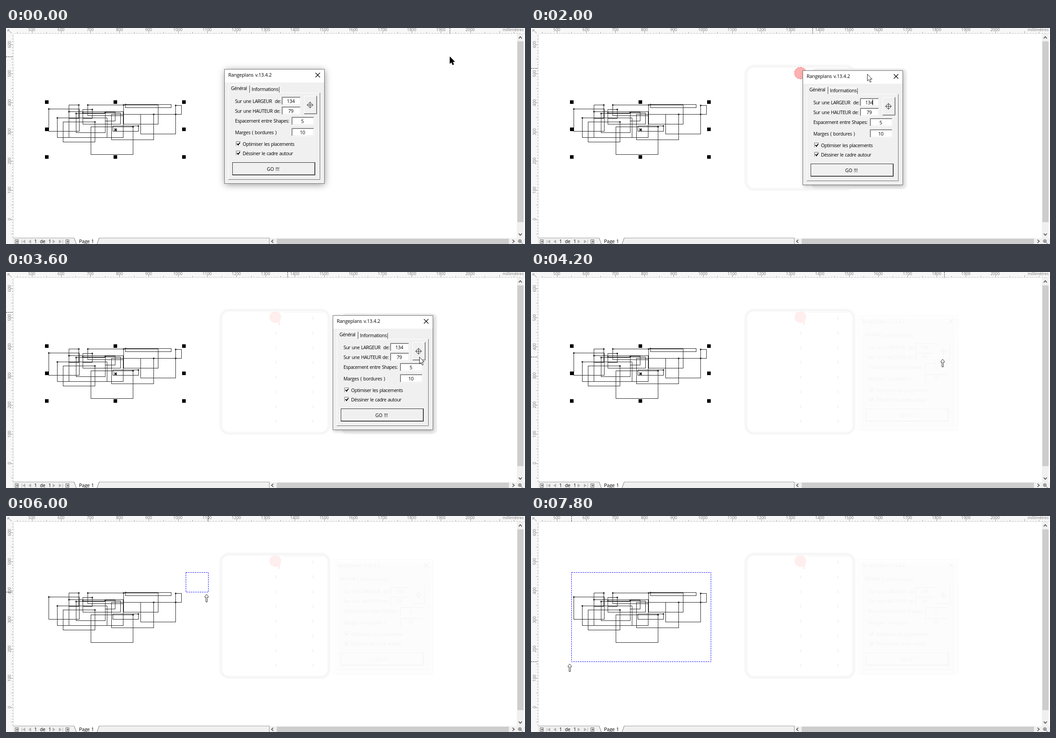
Write an HTML page with a canvas that moves like this. It is 1158x484 px and loops after 8 s.

```html
<!DOCTYPE html>
<html lang="fr">
<head>
<meta charset="utf-8">
<title>Alignement de formes</title>
<style>
html, body { margin: 0; width: 100%; height: 100%; overflow: hidden; background: #fff; }
canvas { display: block; }
</style>
</head>
<body>
<canvas id="stage" width="1158" height="484"></canvas>
<script>
const g = document.getElementById('stage').getContext('2d');
const LOOP = 8000, STEP = 200;
const ENTER = 1000, CLICK = 1400, DROP = 2800, CLOSE = 4200, SELECT = 5600;
const UI = '"Open Sans", "Noto Sans", sans-serif';
const ANCHOR = { x: 401, y: 126 };

// Where the pointer rests or turns: time, x, y
const stops = [[0, 990, 64], [ENTER, 628, 90], [1480, 602, 100], [2400, 840, 105], [DROP, 845, 105],
  [3600, 922, 190], [CLOSE, 922, 190], [5000, 220, 130], [SELECT, ANCHOR.x, ANCHOR.y],
  [6600, 557, 264], [7800, 90, 326]];

// Rectangles from their first node: x, y, width, height (a negative width runs left)
const shapes = [[95, 181, 68, 50], [114, 201, 111, 44], [198, 210, -71, 45], [162, 172, -22, 30],
  [140, 187, 121, 58], [156, 191, 65, 43], [192, 182, -21, 20], [171, 190, 84, 25],
  [182, 172, 80, 24], [262, 172, 77, 43], [266, 171, 102, 7], [221, 188, 22, 20],
  [329, 193, -94, 57], [378, 193, -78, 44], [295, 219, -57, 12], [283, 221, -94, 62],
  [378, 173, 13, 20]];

const ease = u => u * u * u * (u * (6 * u - 15) + 10);

function pointer(t) {
  const i = stops.findIndex(s => s[0] > t);
  if (i < 0) return stops[stops.length - 1].slice(1);
  const [a, b] = [stops[i - 1], stops[i]], k = ease((t - a[0]) / (b[0] - a[0]));
  return [1, 2].map(n => Math.round(a[n] + (b[n] - a[n]) * k));
}

// The dragged window trails the pointer slightly and stays where it is dropped
function dialogPlace(t) {
  const [x, y] = pointer(Math.min(Math.max(t - 58, CLICK), DROP));
  return [x - 115, y - 8];
}

function fill(x, y, w, h, color) {
  g.fillStyle = color;
  g.fillRect(x, y, w, h);
}

function frame(x, y, w, h, color) {
  g.strokeStyle = color;
  g.strokeRect(x + .5, y + .5, w, h);
}

function rounded(x, y, w, h, r) {
  g.beginPath();
  g.roundRect(x, y, w, h, r);
}

function circle(x, y, r) {
  g.beginPath();
  g.arc(x, y, r, 0, Math.PI * 2);
}

function line(color, width, ...pts) {
  g.strokeStyle = color;
  g.lineWidth = width;
  g.beginPath();
  pts.forEach(([x, y]) => g.lineTo(x, y));
  g.stroke();
  g.lineWidth = 1;
}

function poly(color, ...pts) {
  g.fillStyle = color;
  g.beginPath();
  pts.forEach(([x, y]) => g.lineTo(x, y));
  g.closePath();
  g.fill();
}

function dashed(pattern, draw) {
  g.setLineDash(pattern);
  draw();
  g.setLineDash([]);
}

function cross(x, y, r, width) {
  line('#000', width, [x - r, y - r], [x + r, y + r]);
  line('#000', width, [x + r, y - r], [x - r, y + r]);
}

// Two-tone edge: one colour on the top and left, another on the bottom and right
function bevel(x, y, w, h, light, dark) {
  line(light, 1, [x + .5, y + h], [x + .5, y + .5], [x + w, y + .5]);
  line(dark, 1, [x, y + h - .5], [x + w - .5, y + h - .5], [x + w - .5, y]);
}

function text(s, x, y, { size = 10.5, color = '#000', align = 'left', spacing = -.45 } = {}) {
  g.font = `${size}px ${UI}`;
  g.letterSpacing = spacing + 'px';
  g.wordSpacing = '1px';
  g.textAlign = align;
  g.fillStyle = color;
  g.fillText(s, x, y);
}

function rulers() {
  const label = { size: 9, color: '#777', align: 'center', spacing: 0 };
  fill(0, 0, 1158, 13, '#f7f7f7');
  fill(0, 0, 17, 484, '#f7f7f7');
  const tick = k => k % 10 ? (k % 5 ? 2 : 4) : 6;
  for (let k = -5; k < 168; k++) fill(Math.round(57.5 + k * 6.52), 13 - tick(k), 1, tick(k), '#9a9a9a');
  for (let k = -6; k < 64; k++) fill(16 - tick(k), Math.round(428.5 - k * 6.53), tick(k), 1, '#9a9a9a');
  fill(17, 12, 1141, 1, '#e0e0e0');
  fill(16, 13, 1, 471, '#e0e0e0');
  for (let i = 0; i < 16; i++) text(500 + i * 100, 57.5 + i * 65.2, 7, label);
  text('millimètres', 1131.5, 7, label);
  for (let i = 0; i < 7; i++) {
    g.save();
    g.translate(11, 428.5 - i * 65.3);
    g.rotate(-Math.PI / 2);
    text(i * 100, 0, 0, label);
    g.restore();
  }
  fill(0, 0, 16, 12, '#f7f7f7');
  line('#888', 1, [4, 8], [4, 4], [8, 4]);
  line('#888', 1, [4, 4], [13, 12]);
}

function chevron(x, y, dx, dy) {
  line('#444', 1.6, [x - dx * 2 + dy * 3.5, y - dy * 2 + dx * 3.5], [x + dx * 2, y + dy * 2],
    [x - dx * 2 - dy * 3.5, y - dy * 2 - dx * 3.5]);
}

function pageIcon(x) {
  frame(x - 4, 474, 7, 8, '#666');
  fill(x - 2, 478, 5, 1, '#444');
  fill(x, 476, 1, 5, '#444');
}

function playIcon(x, d, bar) {
  poly('#b4b4b4', [x - 3 * d, 474], [x - 3 * d, 483], [x + 3 * d, 478.5]);
  if (bar) fill(x + 5 * d, 474, 1, 9, '#b4b4b4');
}

function bars() {
  fill(1140, 13, 15, 458, '#f0f0f0');
  fill(1141, 30, 14, 405, '#cdcdcd');
  chevron(1147.5, 21.5, 0, -1);
  chevron(1147.5, 462.5, 0, 1);
  fill(17, 471, 1141, 13, '#f0f0f0');
  fill(17, 470, 571, 1, '#a0a0a0');
  poly('#fff', [152, 470], [208, 470], [203, 484], [157, 484]);
  line('#777', 1, [152, 470.5], [157, 484]);
  line('#777', 1, [208, 470.5], [203, 484]);
  pageIcon(24);
  playIcon(40, -1, true);
  playIcon(53, -1);
  text('1  de  1', 63, 482, { spacing: -.2 });
  playIcon(107, 1);
  playIcon(121, 1, true);
  pageIcon(137);
  text('Page 1', 163, 481.5, { size: 11, spacing: -.3 });
  fill(587, 471, 1, 13, '#999');
  fill(604, 472, 518, 12, '#cdcdcd');
  chevron(594.5, 478, -1, 0);
  chevron(1132, 478, 1, 0);
  circle(1146.5, 477.5, 3.5);
  g.strokeStyle = '#555';
  g.stroke();
  line('#555', 1, [1149, 480], [1153, 484]);
  fill(1144, 477, 5, 1, '#555');
  fill(1146, 475, 1, 5, '#555');
}

function drawing(selected) {
  for (const [x, y, w, h] of shapes) frame(x, y, w, h, '#222');
  for (const [x, y] of shapes) {
    fill(x - 1, y - 1, 3, 3, '#fff');
    frame(x - 1, y - 1, 2, 2, '#000');
  }
  if (!selected) return;
  for (const i of [-1, 0, 1]) for (const j of [-1, 0, 1]) {
    const x = 244 + i * 153, y = 227.5 + j * 61.5;
    if (i || j) fill(x - 4, Math.floor(y) - 4, 8, 8, '#000');
    else cross(x + .5, y + .5, 2.5, 2);
  }
}

function clickMark(t) {
  if (t < CLICK || t > 2000) return;
  circle(601, 101, 13);
  g.fillStyle = 'rgba(255,100,100,.5)';
  g.fill();
  g.strokeStyle = '#f06060';
  dashed([4, 2], () => g.stroke());
}

// Faint remains of the window's earlier places
function remains(t) {
  if (t < 2000) return;
  for (const [color, width] of [['#fafafa', 8], ['#f3f3f3', 2]]) {
    rounded(479.5, 85.5, 241, 276, 18);
    g.strokeStyle = color;
    g.lineWidth = width;
    g.stroke();
  }
  g.lineWidth = 1;
  if (t < 2200) return;
  for (const x of [602, 685]) {
    dashed([7, 26], () => line('#f6f6f6', 3, [x, 100], [x, 358]));
  }
  circle(601, 101, 13);
  g.fillStyle = '#ffeeee';
  g.fill();
  fill(607, 108, 4, 11, '#ffeeee');
  fill(620, 90, 86, 1, '#f4f4f4');
  if (t < CLOSE) return;
  g.globalAlpha = .04;
  dialog(t);
  g.globalAlpha = 1;
}

function field(x, y, w, h, value) {
  fill(x, y, w, h, '#fff');
  bevel(x, y, w, h, '#a0a0a0', '#fff');
  bevel(x + 1, y + 1, w - 2, h - 2, '#696969', '#e3e3e3');
  text(value, x + w / 2 - 1, y + 14, { align: 'center', spacing: -.2 });
}

function checkbox(y, label) {
  fill(25, y, 11, 11, '#fff');
  bevel(25, y, 11, 11, '#696969', '#e3e3e3');
  line('#000', 2, [27.5, y + 5], [30, y + 8], [34, y + 2.5]);
  text(label, 40, y + 9.5);
}

function targetButton(down) {
  bevel(177, 61, 29, 41, down ? '#696969' : '#fff', down ? '#fff' : '#696969');
  bevel(178, 62, 27, 39, '#f0f0f0', '#a0a0a0');
  circle(190.5, 81.5, 5);
  g.strokeStyle = '#333';
  g.stroke();
  fill(183, 81, 15, 1, '#333');
  fill(190, 74, 1, 15, '#333');
}

function dialogBack(moved) {
  if (moved) {
    rounded(20, -4, 212, 270, 9);
    g.fillStyle = '#f1f1f1';
    g.fill();
  }
  g.shadowColor = `rgba(0,0,0,${moved ? .3 : .42})`;
  g.shadowBlur = moved ? 8 : 15;
  g.shadowOffsetX = 1;
  g.shadowOffsetY = 3;
  fill(0, 0, 222, 256, '#f0f0f0');
  g.shadowColor = 'transparent';
  fill(0, 0, 222, 30, '#fff');
  frame(-1, 0, 223, 256, '#707070');
}

function dialog(t) {
  g.save();
  g.translate(...dialogPlace(t));
  dialogBack(t >= 2000);
  g.translate(0, -1);
  text('Rangeplans v.13.4.2', 8, 18, { size: 10.7, spacing: -.15 });
  cross(207.5, 14.5, 5, 1.2);

  bevel(8, 54, 205, 195, '#fff', '#696969');
  fill(9, 54, 46, 1, '#f0f0f0');
  line('#fff', 1, [8.5, 55], [8.5, 38.5], [10, 36.5], [54, 36.5]);
  line('#444', 1, [55.5, 38], [55.5, 54]);
  line('#fff', 1, [58, 39.5], [120, 39.5]);
  line('#444', 1, [121.5, 41], [121.5, 54]);
  text('Général', 14, 48);
  text('Informations', 60, 50, { spacing: -.3 });

  text('Sur une LARGEUR  de:', 23, 77);
  text('Sur une HAUTEUR de:', 23, 98.5);
  text('Espacement entre Shapes:', 23, 121);
  text('Marges ( bordures )', 23, 147, { spacing: -.3 });
  field(127, 63, 43, 19, '134');
  field(127, 85, 43, 19, '79');
  field(149, 108, 51, 19, '5');
  field(149, 133, 51, 19, '10');
  if (t >= 1800 && t < 3200) fill(155, 66, 1, 13, '#000');
  targetButton(t === 4000);
  checkbox(163, 'Optimiser les placements');
  checkbox(184, 'Déssiner le cadre autour');

  frame(17, 210, 184, 28, '#222');
  bevel(18, 211, 183, 27, '#fff', '#696969');
  text('GO !!!', 108, 228.5, { align: 'center', spacing: 0 });
  g.restore();
}

function marks([x, y]) {
  dashed([2, 2], () => {
    line('#000', 1, [x + .5, 0], [x + .5, 13]);
    line('#000', 1, [0, y + .5], [16, y + .5]);
  });
}

function marquee([x, y]) {
  dashed([3, 2], () => frame(ANCHOR.x, ANCHOR.y, x - ANCHOR.x, y - ANCHOR.y, '#00f'));
}

function cursor([x, y], t) {
  const half = [[4, 5], [4, 6.5], [1.5, 6.5], [1.5, 17]];
  const mirrored = half.map(([a, b]) => [-a, b]).reverse();
  const up = t >= CLOSE;
  const outline = up ? [[0, 0], ...half, ...mirrored]
    : [[0, 0], [0, 15], [3.5, 12], [6, 18], [8.5, 17], [6, 11], [10.5, 11]];
  const outside = t < ENTER;
  g.save();
  g.translate(x + (up ? -3.5 : .5), y + (up ? 5.5 : .5));
  poly(outside ? '#000' : '#fff', ...outline);
  line(outside ? '#000' : '#222', 1, ...outline, outline[0]);
  g.restore();
}

function render(now) {
  const t = Math.floor(now % LOOP / STEP) * STEP;
  const open = t < CLOSE, selecting = t > SELECT, place = pointer(t);
  fill(0, 0, 1158, 484, '#fff');
  rulers();
  bars();
  marks(open ? pointer(Math.min(t, ENTER)) : place);
  remains(t);
  drawing(!selecting);
  if (t >= 2000) clickMark(t);
  if (open) dialog(t);
  if (t < 2000) clickMark(t);
  if (selecting) marquee(place);
  cursor(place, t);
}

const start = performance.now();
function tick() {
  render(performance.now() - start);
  requestAnimationFrame(tick);
}
tick();
</script>
</body>
</html>
```
